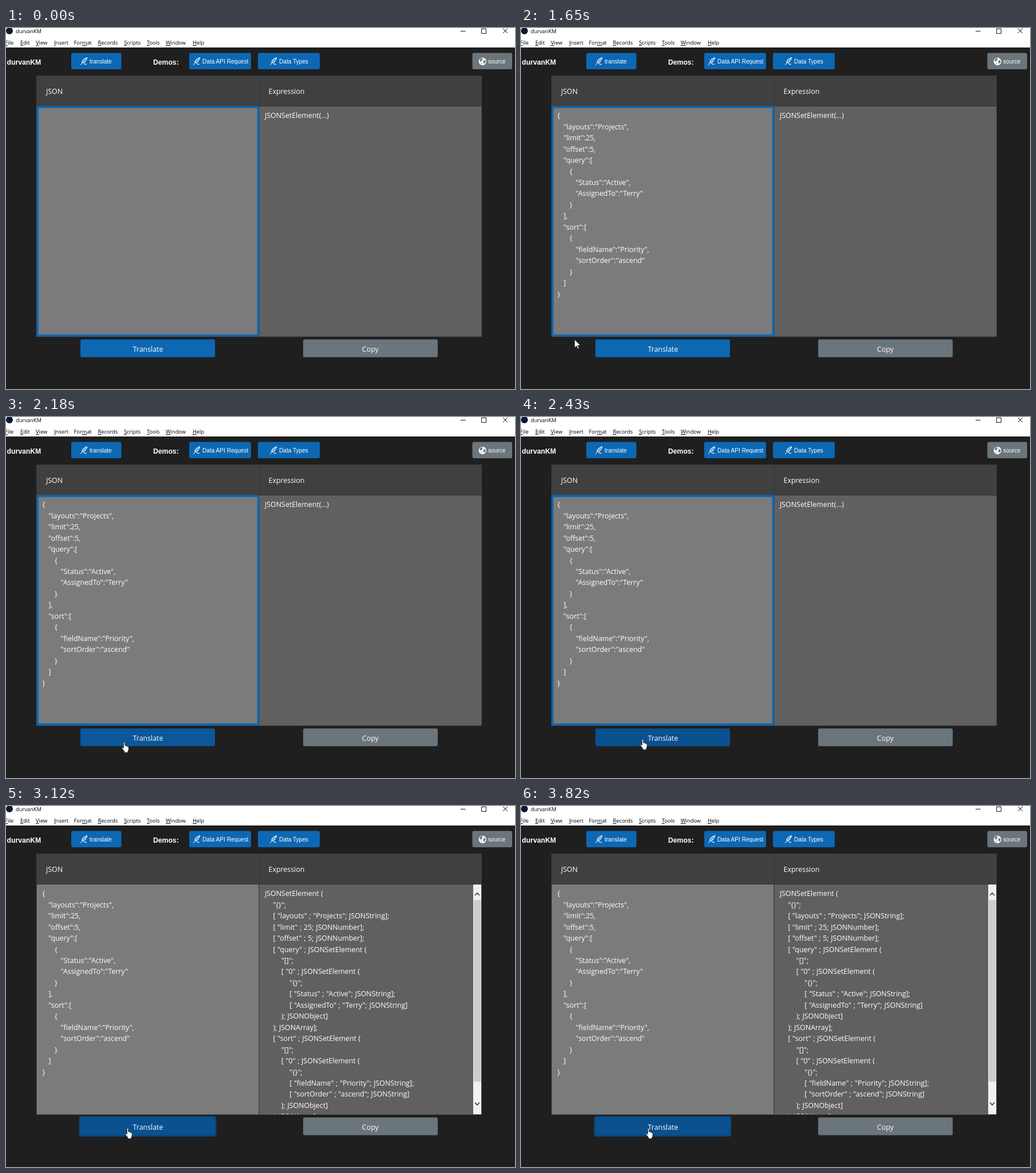
These frames come from a looping animation (889x630 px, 3900 ms). An HTML page:

```html
<!DOCTYPE html>
<html lang="en">
<head>
<meta charset="utf-8">
<style>
html, body { margin: 0; width: 100%; height: 100%; overflow: hidden; background: #1f1f1f; }
svg { display: block; }
text { font-family: "Open Sans", "Noto Sans", sans-serif; font-size: 12.4px; fill: #fff; white-space: pre; }
.menu text { font-size: 9.3px; fill: #000; }
.menu .key { text-decoration: underline; }
.bar text { font-family: "Liberation Sans", Arial, sans-serif; font-size: 10.1px; }
.bar .bold { font-size: 12.2px; font-weight: bold; }
.mid { text-anchor: middle; }
.code { word-spacing: .4px; }
</style>
</head>
<body>
<svg width="889" height="630" viewBox="0 0 889 630">
  <defs>
    <g id="quill" fill="none" stroke="#fff" stroke-linecap="round">
      <path d="M.5 13.5Q4 8 10.5 1.5" stroke-width="1"/>
      <path d="M3 9.5Q3 3.5 11.5 .7Q11 5 7.5 7.2L8.5 7.5Q7 9.5 4.2 9.8M6 10.5Q8 13.5 10.5 12" stroke-width="1.1"/>
    </g>
    <clipPath id="pane"><rect x="443" y="137" width="373" height="401"/></clipPath>
  </defs>
  <rect width="889" height="630" fill="#1f1f1f"/>
  <rect width="889" height="34" fill="#fff"/>
  <circle cx="6" cy="5" r="6" fill="#0b1a33"/>
  <path d="M794 5.5h8.5M830.5 1.5h8v8h-8zM868 1l8 8m0-8l-8 8" fill="none" stroke="#111"/>
  <g class="menu" id="menu"><text x="17" y="9">durvanKM</text></g>

  <g class="bar" id="bar">
    <text class="bold" x="1.5" y="64">durvanKM</text>
    <text class="bold" x="257" y="64">Demos:</text>
  </g>

  <rect x="53" y="83" width="778" height="54" fill="#404040"/>
  <path d="M53 136.5H831M442.5 83V137" stroke="#363636"/>
  <text x="70" y="115">JSON</text>
  <text x="458.5" y="115">Expression</text>

  <rect x="53.5" y="137" width="388" height="401" fill="#7b7b7b"/>
  <rect x="443" y="137" width="387.5" height="401" fill="#606060"/>
  <path d="M53.5 137V538.5H830.5V137M442.5 137V538" fill="none" stroke="#4c4c4c"/>
  <rect id="focus" x="55" y="138" width="385.5" height="398.5" fill="none" stroke="#0c67b5" stroke-width="3.6"/>
  <g class="code" id="json"></g>
  <text class="code" id="hint" x="452" y="157.3">JSONSetElement(...)</text>
  <g id="result">
    <g class="code" id="expr" clip-path="url(#pane)"></g>
    <rect x="816" y="137" width="14" height="401" fill="#f1f1f1"/>
    <rect x="817" y="164" width="12.5" height="317" fill="#cdcdcd"/>
    <path d="M819 156l4-4.2 4 4.2M819 517.5l4 4.2 4-4.2" fill="none" stroke="#444" stroke-width="1.7"/>
  </g>

  <rect id="ring" x="127.5" y="541" width="240" height="36" rx="4" fill="#0d4373"/>
  <rect id="go" x="130" y="543.5" width="235" height="31" rx="2.5"/>
  <text class="mid" id="goText" x="248" y="564.5">Translate</text>
  <rect x="519" y="543.5" width="235" height="31" rx="2.5" fill="#6b757c"/>
  <text class="mid" x="636.3" y="564.5">Copy</text>

  <circle id="click" cx="210" cy="562" r="10" fill="#82a03c"/>
  <g id="cursor" fill="#fff" stroke="#111" stroke-width=".8" stroke-linejoin="round">
    <path id="arrow" d="M.5 .5V15l3.4-3.2 2.2 5.2 2.2-1-2.2-5h4.6z"/>
    <path id="hand" d="M-.7 11V1.7Q-.7 .5 .5 .5T1.8 1.7V6.5q2-.6 2.4.8 1.7-.5 2 .8 2-.4 2 1.4V13q0 2-1.4 3.5v2.2H.8V16.8l-4-5.3q-.8-1.6.6-1.9 1-.1 1.9 1.4z"/>
  </g>
</svg>
<script>
const LOOP = 3900, LINE = 19.45;
const $ = id => document.getElementById(id);
const add = (id, markup) => $(id).insertAdjacentHTML('beforeend', markup);

// Underscore marks the access key.
[['_File', -1.5], ['_Edit', 25], ['_View', 52], ['_Insert', 84], ['For_mat', 118.5], ['_Records', 160.5],
 ['_Scripts', 206], ['_Tools', 246], ['_Window', 279], ['_Help', 326]].forEach(([label, x]) =>
  add('menu', `<text x="${x}" y="29">${label.replace(/_(.)/, '<tspan class="key">$1</tspan>')}</text>`));

[['translate', 114, 87.5, 146], ['Data API Request', 320, 108, 343], ['Data Types', 440, 108, 477], ['source', 814.5, 69.5, 842]]
  .forEach(([label, x, w, tx], i) => {
    const icon = i < 3
      ? `<use href="#quill" x="${tx - 16}" y="51"/>`
      : '<circle cx="832.3" cy="58.3" r="6.6" fill="#fff"/><path d="M828 54l3-1.5 2 1.5-2 2.2-1 2.5-2.5-1zM834 57l3-1 .8 3-2.3 3.2-2-1.7zM829.5 60.5l2.2 1-.7 2z" fill="#6b757c"/>';
    add('bar', `<rect x="${x}" y="43.5" width="${w}" height="28.5" rx="3" fill="${i < 3 ? '#0d68b4' : '#6b757c'}"/>${icon}<text x="${tx}" y="62">${label}</text>`);
  });

// Each leading space is one indent level.
function listing(id, x, indent, source) {
  source.split('\n').forEach((line, i) => {
    const body = line.trimStart();
    add(id, `<text x="${x + (line.length - body.length) * indent}" y="${157.3 + i * LINE}">${body}</text>`);
  });
}

listing('json', 63.5, 10.7, `{
 "layouts":"Projects",
 "limit":25,
 "offset":5,
 "query":[
  {
   "Status":"Active",
   "AssignedTo":"Terry"
  }
 ],
 "sort":[
  {
   "fieldName":"Priority",
   "sortOrder":"ascend"
  }
 ]
}`);

listing('expr', 452, 14.4, `JSONSetElement (
 "{}";
 [ "layouts" ; "Projects"; JSONString];
 [ "limit" ; 25; JSONNumber];
 [ "offset" ; 5; JSONNumber];
 [ "query" ; JSONSetElement (
  "[]";
  [ "0" ; JSONSetElement (
   "{}";
   [ "Status" ; "Active"; JSONString];
   [ "AssignedTo" ; "Terry"; JSONString]
  ); JSONObject]
 ); JSONArray];
 [ "sort" ; JSONSetElement (
  "[]";
  [ "0" ; JSONSetElement (
   "{}";
   [ "fieldName" ; "Priority"; JSONString];
   [ "sortOrder" ; "ascend"; JSONString]
  ); JSONObject]
 ); JSONArray]`);

// time, x, y of the pointer tip
const pointer = [
  [1650, 93, 543], [1730, 122, 571], [1800, 180, 579], [1880, 256, 579], [1960, 237, 577], [2030, 216, 575],
  [2110, 203, 570], [2180, 206, 567], [2260, 209, 565], [2350, 211, 563], [2430, 212, 562], [3820, 222, 562]
];
const shades = [[0, '#0d68b4'], [2110, '#0d60a8'], [2180, '#0b5799'], [2260, '#0a5190']];
const at = (steps, t) => steps.findLast(step => step[0] <= t);
const show = (id, on) => { $(id).style.display = on ? '' : 'none'; };

function render(t) {
  const done = t >= 3120, pressed = t >= 3040 && !done, spot = at(pointer, t);
  show('json', t >= 780);
  show('focus', !done);
  show('hint', !done);
  show('result', done);
  show('ring', done);
  show('click', pressed);
  show('cursor', spot);
  show('arrow', t < 2110);
  show('hand', t >= 2110);
  $('go').setAttribute('fill', at(shades, t)[1]);
  $('goText').setAttribute('transform', pressed ? 'translate(1 1)' : '');
  if (spot) $('cursor').setAttribute('transform', `translate(${spot[1]} ${spot[2]})`);
}

const start = performance.now();
function tick(now) {
  render(Math.max(0, now - start) % LOOP);
  requestAnimationFrame(tick);
}
render(0);
requestAnimationFrame(tick);
</script>
</body>
</html>
```
